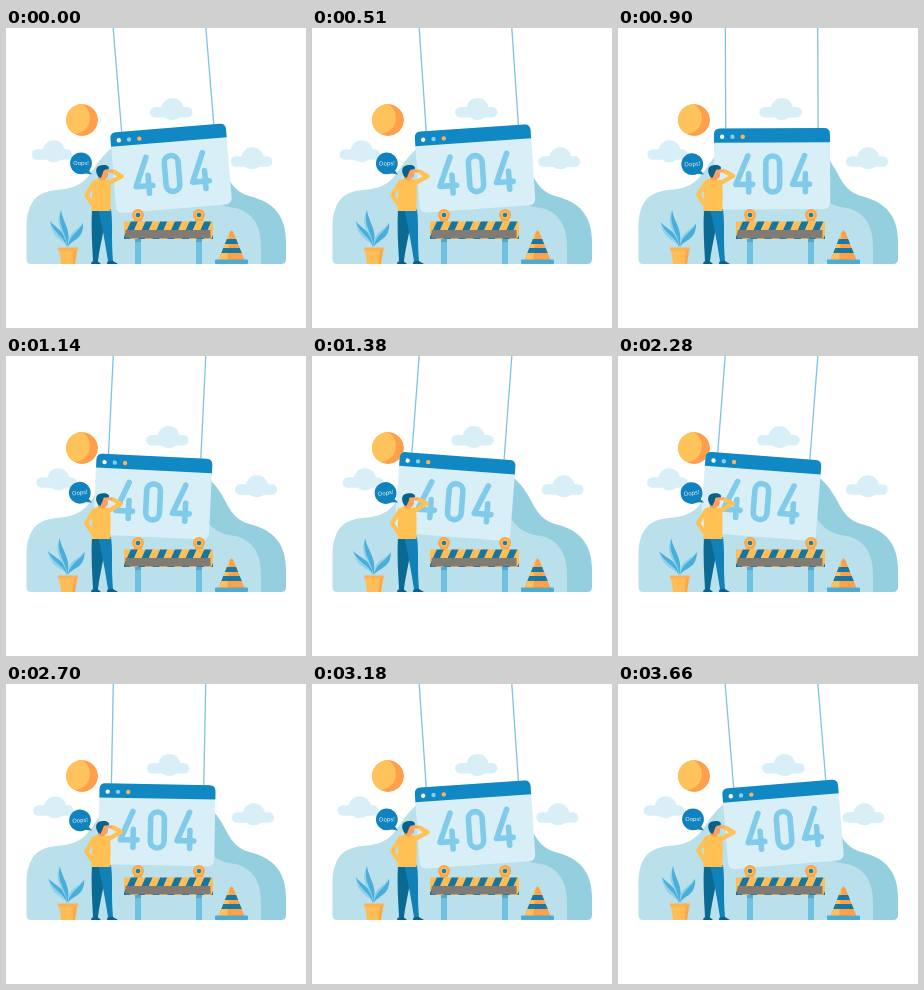
Write an HTML page that moves like this. It is 300x300 px and loops after 3690 ms.

```html
<!DOCTYPE html>
<html lang="en">
<head>
<meta charset="utf-8">
<title>404</title>
<style>
html, body { margin: 0; width: 100%; height: 100%; overflow: hidden; background: #fff; }
svg { display: block; width: 100vw; height: 100vh; }
text { font: 5.7px "Open Sans", "Noto Sans", sans-serif; }
</style>
</head>
<body>
<svg viewBox="0 0 300 300">
  <defs>
    <clipPath id="sunClip"><circle cx="76" cy="92" r="16"/></clipPath>
    <clipPath id="boardClip"><rect x="118" y="193.500" width="89" height="17.500"/></clipPath>
    <clipPath id="coneClip"><path d="M223.500 204.500Q225.500 200.500 227.500 204.500L238.500 232H212.500Z"/></clipPath>
    <g id="lamp">
      <circle r="6" fill="#ffa546"/>
      <circle r="3.400" fill="#ffc45c"/>
      <circle r="2.300" fill="#1580b2"/>
      <rect x="-4" y="4.500" width="8" height="2" fill="#ffa546"/>
    </g>
    <path id="four" d="M14.800 2.500L2.800 31H19.500M15.500 20.500V38.500"/>
  </defs>

  <!-- hills -->
  <path fill="#94cfdf" d="M100 236V150C118 112 185 105 203 123C223 141 220 161 243 168C268 174 280 188 280 214V231Q280 236 275 236Z"/>
  <path fill="#b9e0eb" d="M25 236Q20.500 236 20.500 231V200C20.500 175 30 163.500 51 162C75 160 80 152 89 139C104 117 119 108 143 109C174 110 184 131 193 151C201 170 211 178 229 180C247 184 255 198 255 218V236Z"/>

  <!-- sky -->
  <g clip-path="url(#sunClip)">
    <circle cx="76" cy="92" r="16" fill="#ff9f4c"/>
    <circle cx="68" cy="90" r="16" fill="#ffc35c"/>
  </g>
  <g id="clouds" fill="#d9eff7"></g>

  <!-- hanging window -->
  <g id="sign">
    <path d="M107.300-12V102M199.700-12V102" stroke="#7dc3e3" stroke-width="1.300"/>
    <rect x="95.500" y="100.300" width="116" height="81" rx="6" fill="#d9eff8"/>
    <path fill="#1088c4" d="M95.500 114.500V106.300Q95.500 100.300 101.500 100.300H205.500Q211.500 100.300 211.500 106.300V114.500Z"/>
    <circle cx="103.700" cy="108.600" r="2.200" fill="#fff"/>
    <circle cx="114" cy="108.600" r="2.200" fill="#86cdea"/>
    <circle cx="124.300" cy="108.600" r="2.200" fill="#ffb255"/>
    <g fill="none" stroke="#80cbe9" stroke-width="5.600" stroke-linecap="round" stroke-linejoin="round" role="img" aria-label="404">
      <use href="#four" x="114.500" y="125.300"/>
      <rect x="147.200" y="128" width="13.800" height="36" rx="6.900"/>
      <use href="#four" x="171.200" y="125.300"/>
    </g>
  </g>

  <!-- barrier -->
  <path fill="#70c1e0" d="M129 208H135V236H129ZM190 208H196V236H190Z"/>
  <path fill="#4eabd2" d="M129 211H135V214H129ZM190 211H196V214H190Z"/>
  <use href="#lamp" x="132" y="187"/>
  <use href="#lamp" x="193" y="187"/>
  <g clip-path="url(#boardClip)">
    <rect x="117" y="193" width="91" height="19" fill="#ffbd56"/>
    <g id="stripes" fill="#16769f"></g>
  </g>
  <rect x="119.500" y="202" width="85" height="8.300" fill="#817b76"/>

  <!-- cone -->
  <g clip-path="url(#coneClip)">
    <rect x="210" y="200" width="32" height="33" fill="#ffa044"/>
    <path fill="#ffc05a" d="M209 200H224L221 233H209Z"/>
    <path fill="#1679a7" d="M210 211H242V216H210ZM210 220H242V225H210Z"/>
  </g>
  <rect x="209" y="231.500" width="33" height="4.500" rx="1" fill="#4eabd2"/>

  <!-- plant -->
  <g id="leafL">
    <path fill="#8fd0ea" d="M61 219C58 211 46 212 44 193C49 204 60 202 61 219Z"/>
    <path fill="#4aaeda" d="M61 219C58 208 48 206 44 193C51 202 61 203 61 219Z"/>
  </g>
  <g id="leafM">
    <path fill="#8fd0ea" d="M61.500 219C60 206 47 199 55 182C54 194 65 200 61.500 219Z"/>
    <path fill="#4aaeda" d="M61.500 219C61 206 51 198 55 182C57 195 66 202 61.500 219Z"/>
  </g>
  <g id="leafR">
    <path fill="#8fd0ea" d="M62 219C61 204 70 204 77 195C77 211 65 209 62 219Z"/>
    <path fill="#4aaeda" d="M62 219C63 207 72 205 77 195C78 212 66 211 62 219Z"/>
  </g>
  <path fill="#ffbd57" d="M53 222H71L69 236H55Z"/>
  <path fill="#ffa64a" d="M68 222H71L69 236H66.500Z"/>
  <rect x="52" y="219.500" width="20" height="3" fill="#ffb14f"/>

  <!-- man -->
  <path fill="#0a6a92" d="M86 181H100C99 201 94 216 92 233H87C86 215 85 198 86 181Z"/>
  <path fill="#1281b8" d="M92 181H105C107 196 105 211 107 233H102C99 214 97 202 92 181Z"/>
  <path fill="#0c5f8c" d="M85 236Q85.500 233 88 233H91.500L95 236ZM101 236Q101 233 103 233H107L112 236Z"/>
  <g id="torso">
    <path fill="#ff9f55" d="M92 146H99V154H92Z"/>
    <path fill="#ffc154" d="M91 151C95 153 99 153 102 151C106 154 104.500 169 104.500 183H85.500C86 174 86 166 86 158Q87 152 91 151Z"/>
    <path fill="none" stroke="#ffc154" stroke-width="4.400" stroke-linecap="round" stroke-linejoin="round" d="M88 154.500L80.300 167L86 176"/>
    <g id="head">
      <path fill="#ff9f5c" d="M93 142H101L102 147Q101 152 96 151Q92 149 93 142Z"/>
      <path fill="#0b6288" d="M91 147C88 141 91 137 97 137C101 136.500 104 139 102 141.500C99 142.500 97 142 96.500 145L94.500 150Q92 149.500 91 147Z"/>
    </g>
    <g id="arm">
      <path fill="none" stroke="#ffc154" stroke-width="4.400" stroke-linecap="round" stroke-linejoin="round" d="M102 155.500L115 147.800L107 143.500"/>
      <path fill="none" stroke="#ffa562" stroke-width="3" stroke-linecap="round" d="M105 142.800L99 143"/>
    </g>
  </g>

  <g id="bubble">
    <path fill="#1083be" d="M82 141L86 146.500L77 145Z"/>
    <circle cx="75" cy="135.300" r="10.900" fill="#1083be"/>
    <text x="75" y="137.200" text-anchor="middle" fill="#fff">Oops!</text>
  </g>
</svg>
<script>
const LOOP = 3690, STEP = 30;
const $ = id => document.getElementById(id);

function add(parent, tag, attrs) {
  const el = document.createElementNS("http://www.w3.org/2000/svg", tag);
  for (const k in attrs) el.setAttribute(k, attrs[k]);
  return parent.appendChild(el);
}

function cloud(x, y, w, bump, phase) {
  const g = add($("clouds"), "g", {});
  add(g, "rect", { x, y, width: w, height: 10.6, rx: 5.3 });
  add(g, "circle", { cx: x + bump, cy: y + 2, r: 11 });
  return { g, phase };
}

const clouds = [
  cloud(141.2, 79, 42.5, 22.5, LOOP / 2),
  cloud(28.2, 121.2, 40.5, 22, -290),
  cloud(226.9, 128.2, 42, 22, -290)
];

for (let x = 117; x < 210; x += 14.7)
  add($("stripes"), "path", { d: `M${x} 211l8-18h7l-8 18z` });

// 0 to 1 and back over one loop, resting at both ends
function swing(t) {
  const u = t / LOOP * 2;
  const v = u < 1 ? u : 2 - u;
  return v < .5 ? 4 * v ** 3 : 1 - 4 * (1 - v) ** 3;
}

function turn(id, deg, x, y) {
  $(id).setAttribute("transform", `rotate(${deg.toFixed(3)} ${x} ${y})`);
}

function draw(t) {
  const s = swing(t);
  turn("sign", -4.7 + 9.6 * s, 153.5, 0);
  turn("bubble", -9 * s, 86, 146);
  turn("head", 5 * s, 95, 150);
  turn("arm", 2 - 3 * s, 103, 157);
  turn("torso", .5 - s, 95, 183);
  turn("leafL", -7 * s, 61, 219);
  turn("leafM", -3 * s, 62, 219);
  turn("leafR", 5 * s, 62, 219);
  for (const c of clouds) {
    const dx = -2.8 * Math.cos((t - c.phase) / LOOP * 2 * Math.PI);
    c.g.setAttribute("transform", `translate(${dx.toFixed(2)} 0)`);
  }
}

const start = performance.now();
function tick() {
  const t = (performance.now() - start) % LOOP;
  draw(Math.floor(t / STEP) * STEP);
  requestAnimationFrame(tick);
}
tick();
</script>
</body>
</html>
```
